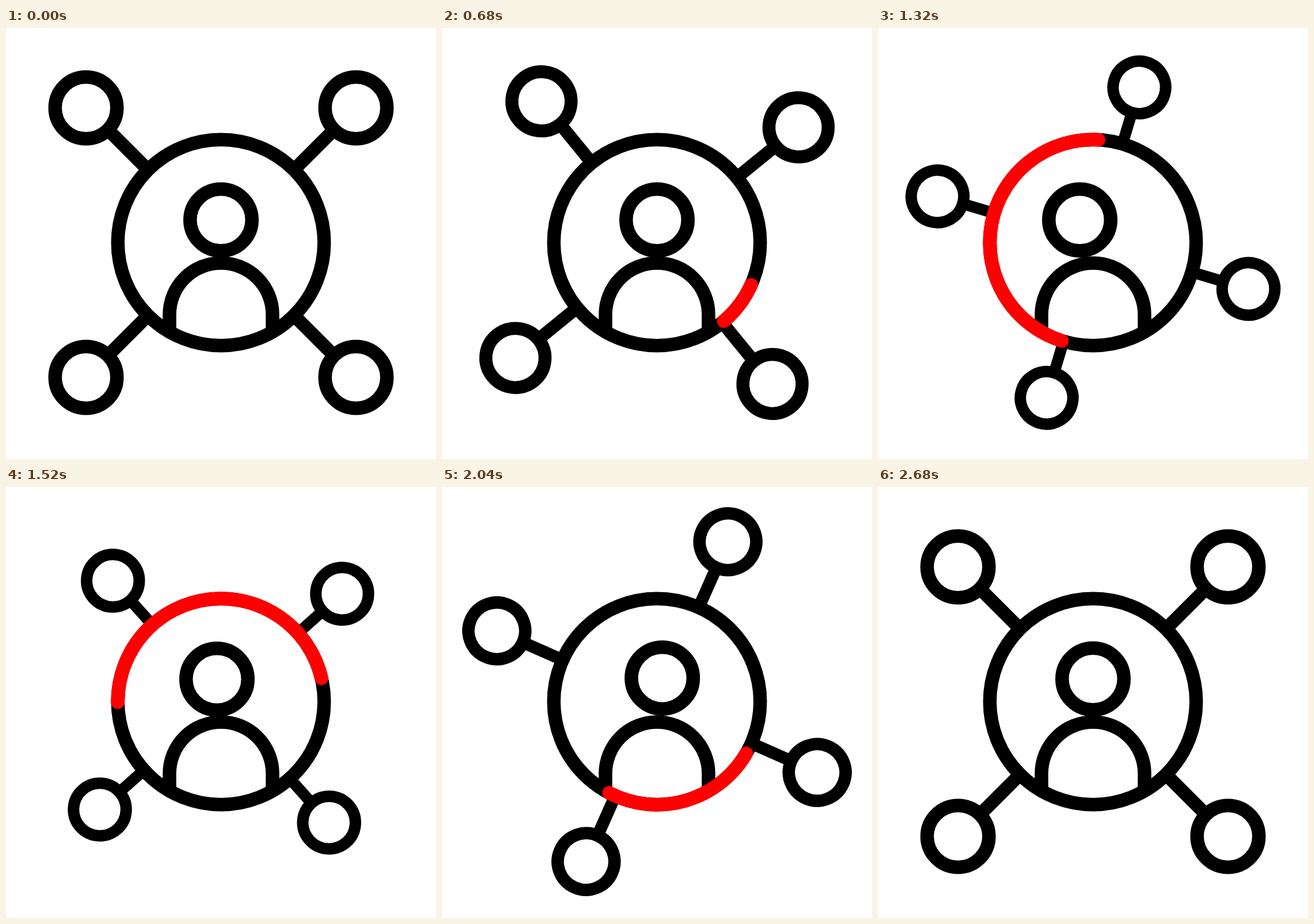
Write an HTML page that moves like this. It is 747 by 750 pixels and loops after 3 s.

```html
<!DOCTYPE html>
<html lang="en">
<head>
<meta charset="utf-8">
<title>Network hub</title>
<style>
html, body { margin: 0; width: 100%; height: 100%; overflow: hidden; background: #fff; }
svg { display: block; width: 747px; height: 750px; }
</style>
</head>
<body>
<svg viewBox="0 0 747 750" fill="none" stroke="#000" stroke-width="23.5">
  <g id="nodes">
    <g id="node">
      <path d="M0 -170V-279" stroke-width="23"/>
      <circle cy="-331.6" r="53.75"/>
    </g>
  </g>
  <circle cx="373.5" cy="373.5" r="179.25" fill="#fff"/>
  <path d="M284 527V498.5A89.5 89.5 0 0 1 463 498.5V527"/>
  <circle id="head" cx="373.5" cy="334" r="53.75"/>
  <path id="arc" stroke="#f00" stroke-width="24" stroke-linecap="round"/>
</svg>
<script>
const LOOP = 3000, STEP = 40, START = 320, END = 2680;
const C = 373.5, R = 179.25, A = 0.533;
const $ = id => document.getElementById(id);
const nodes = $('nodes'), head = $('head'), arc = $('arc');

for (const angle of [45, 135, 225, 315]) {
  const copy = $('node').cloneNode(true);
  copy.removeAttribute('id');
  copy.setAttribute('transform', `rotate(${angle})`);
  nodes.append(copy);
}
$('node').remove();

// Symmetric cubic-bezier(A, 0, 1 - A, 1)
function ease(x) {
  if (x <= 0) return 0;
  if (x >= 1) return 1;
  let lo = 0, hi = 1;
  for (let i = 0; i < 24; i++) {
    const s = (lo + hi) / 2, q = 1 - s;
    if (3 * A * s * q * q + 3 * (1 - A) * s * s * q + s * s * s < x) lo = s;
    else hi = s;
  }
  return lo * lo * (3 - 2 * lo);
}

// Eased value through [time, value] keys
function keyed(keys, t) {
  if (t <= keys[0][0]) return keys[0][1];
  for (let i = 1; i < keys.length; i++) {
    const [t0, a] = keys[i - 1], [t1, b] = keys[i];
    if (t <= t1) return a + (b - a) * ease((t - t0) / (t1 - t0));
  }
  return keys[keys.length - 1][1];
}

// Smooth Hermite curve through [time, value] keys, at rest at both ends
function smooth(keys, t) {
  const last = keys.length - 1;
  const slope = i => i === 0 || i === last ? 0 :
    (keys[i + 1][1] - keys[i - 1][1]) / (keys[i + 1][0] - keys[i - 1][0]);
  let i = 0;
  while (i < last - 1 && t > keys[i + 1][0]) i++;
  const [t0, a] = keys[i], [t1, b] = keys[i + 1];
  const d = t1 - t0, u = (t - t0) / d, v = 1 - u;
  return a + (b - a) * u * u * (3 - 2 * u) +
    d * u * v * (slope(i) * v - slope(i + 1) * u);
}

const SPIN = [[START, 0], [END, 180]];
const SCALE = [[START, 1], [1236, 0.85], [1456, 0.85], [END, 1]];
const HEAD_X = [[740, 0], [1320, -23], [1740, 12.6], [2520, 0]];
const HEAD_Y = [[1320, 0], [1720, 1], [2040, -1.6], [2520, 0]];
const LEAD = [[START, 18.5], [680, 49.6], [1000, 154.5], [1320, 273],
  [1720, 413.2], [2040, 477.6], [2320, 498], [END, 504]];
const TAIL = [[START, 18.5], [680, 24.3], [1000, 45.8], [1320, 107.6],
  [1720, 261.2], [2040, 390.2], [2320, 473], [END, 504]];

function point(deg) {
  const a = deg * Math.PI / 180;
  return `${(C + R * Math.cos(a)).toFixed(3)} ${(C + R * Math.sin(a)).toFixed(3)}`;
}

function draw(t) {
  nodes.setAttribute('transform',
    `translate(${C} ${C}) rotate(${keyed(SPIN, t)}) scale(${keyed(SCALE, t)})`);
  head.setAttribute('transform', `translate(${keyed(HEAD_X, t)} ${keyed(HEAD_Y, t)})`);
  arc.setAttribute('d', t > START && t < END ?
    `M${point(smooth(TAIL, t))}A${R} ${R} 0 0 1 ${point(smooth(LEAD, t))}` : '');
}

function tick() {
  const t = performance.now() % LOOP;
  draw(Math.floor(t / STEP) * STEP);
  requestAnimationFrame(tick);
}
tick();
</script>
</body>
</html>
```
